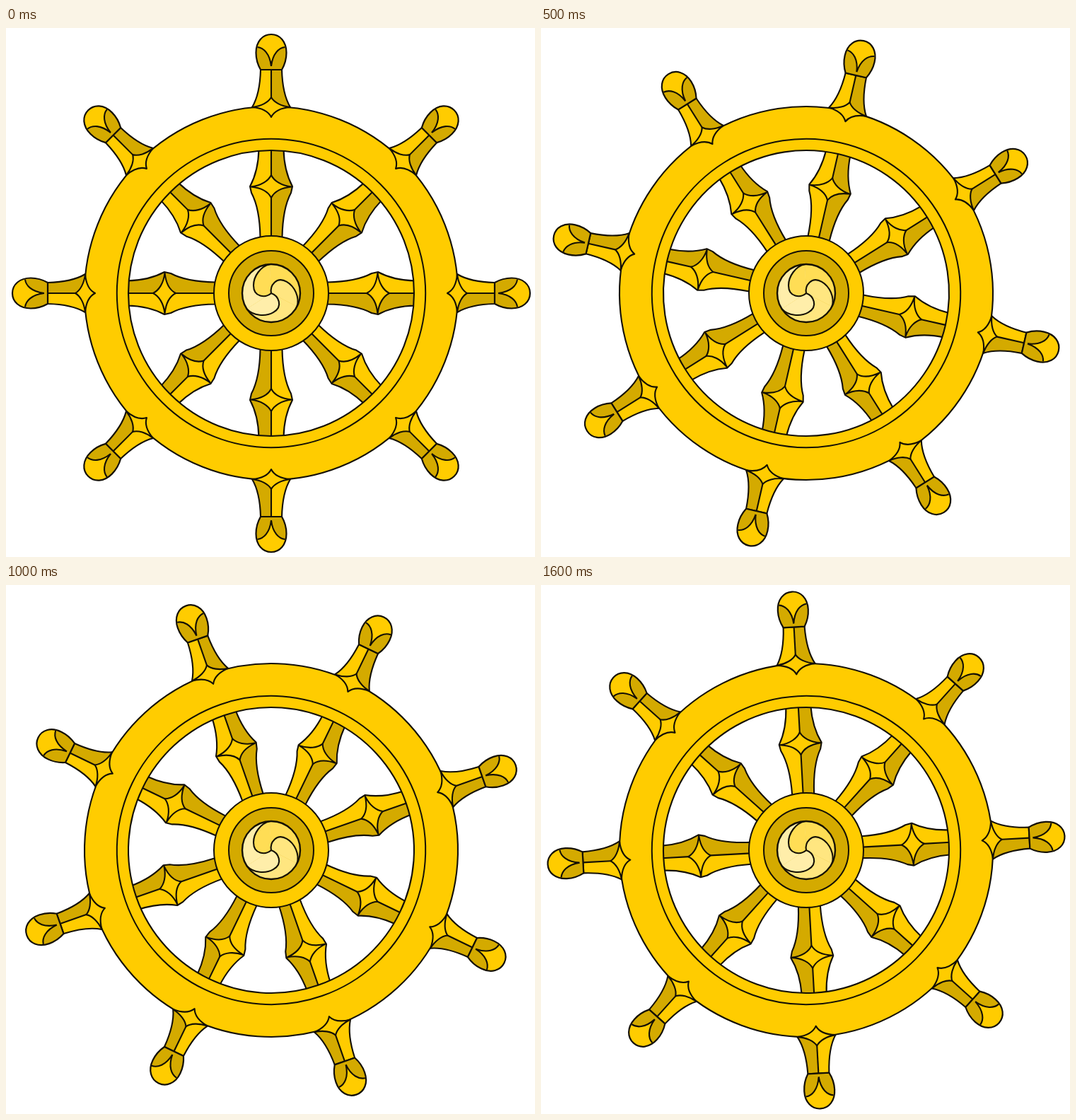
Animation of 748 by 748 pixels, one loop 1700 ms. Source, as an HTML page with a canvas:

```html
<!DOCTYPE html>
<html lang="en">
<head>
<meta charset="utf-8">
<title>Turning wheel</title>
<style>
html, body { margin: 0; width: 100%; height: 100%; overflow: hidden; background: #fff; }
canvas { display: block; width: 748px; height: 748px; }
</style>
</head>
<body>
<canvas id="stage" width="748" height="748"></canvas>
<script>
const ctx = document.getElementById('stage').getContext('2d');
const GOLD = '#ffcc00', SHADE = '#d4aa00', INK = '#141005';
const SWIRL = ['#ffdd55', '#ffe680', '#ffeeaa'];
const CENTER = 375, STEP = 100, STEPS = 17;

// Step number and wheel angle in degrees, linear in between.
const turns = [[0, 0], [2, 5.1], [5, 12.85], [8, 20.7], [12, 30.9], [14, 36.15], [16, 41.85]];

// Paths in wheel space: origin at the hub, one spoke pointing up.
const spokeSide = 'M0-79 L15.5-79 C16-108 20-127 28-142 L30-151 C23-164 18-180 17.5-204 L0-204';
const spoke = new Path2D(spokeSide + ' Z');
const spokeEdge = new Path2D(spokeSide);
const spokeRidge = new Path2D('M0-79 V-135 M0-166 V-204');
const spokeStar = new Path2D(
  'M0-167 C4-159 14-152 29-150.5 C14-149 4-143 0-135 C-4-143-14-149-29-150.5 C-14-152-4-159 0-167 Z');

const neckSide = 'M0-316 L15-316 C15.5-296 18-278 27-263';
const neck = new Path2D(neckSide + ' L0-263 Z');
const neckEdge = new Path2D(neckSide);
const neckRidge = new Path2D('M0-316 V-277');
const rimStar = new Path2D(
  'M0-277 C4-270 14-264.5 27-263 C14-262 4-257 0-249 C-4-257-14-262-27-263 C-14-264.5-4-270 0-277 Z');
const knob = new Path2D(
  'M-15-316 C-19-323-21.5-331-21.5-340 C-21.5-356-12-366 0-366 C12-366 21.5-356 21.5-340 C21.5-331 19-323 15-316 Z');
const petal = new Path2D('M15-316 C19-323 21.5-331 21.5-340 L19.5-348 C11-347 2-339 0-322 L0-316 Z');
const petalEdge = new Path2D('M19.5-348 C11-347 2-339 0-321');

const swirlArm = new Path2D('M0 0 C-8 7-25 6-25-11 C-25-24-15-38-2-41');
const armEnd = Math.atan2(-41, -2);

function paint(path, fill) {
  ctx.fillStyle = fill;
  ctx.fill(path);
}

function line(path, width = 2.1) {
  ctx.lineWidth = width;
  ctx.stroke(path);
}

function shape(path, fill) {
  paint(path, fill);
  line(path);
}

function mirrored(draw) {
  for (const side of [-1, 1]) {
    ctx.save();
    ctx.scale(side, 1);
    draw(side);
    ctx.restore();
  }
}

function around(count, draw) {
  for (let i = 0; i < count; i++) {
    ctx.save();
    ctx.rotate(i * 2 * Math.PI / count);
    draw(i);
    ctx.restore();
  }
}

function disc(radius, fill, width = 2) {
  const path = new Path2D();
  path.arc(0, 0, radius, 0, 2 * Math.PI);
  if (fill) paint(path, fill);
  line(path, width);
}

function drawFacets(area, edge) {
  mirrored(side => {
    paint(area, side > 0 ? SHADE : GOLD);
    line(edge);
  });
}

function drawSpoke() {
  drawFacets(spoke, spokeEdge);
  line(spokeRidge);
  shape(spokeStar, GOLD);
}

function drawHandle() {
  drawFacets(neck, neckEdge);
  line(neckRidge);
  shape(rimStar, GOLD);
  paint(knob, GOLD);
  mirrored(() => {
    paint(petal, SHADE);
    line(petalEdge);
  });
  line(knob, 2.2);
}

function drawRim() {
  const ring = new Path2D();
  ring.arc(0, 0, 264, 0, 2 * Math.PI);
  ring.closePath();
  ring.moveTo(202, 0);
  ring.arc(0, 0, 202, 0, 2 * Math.PI, true);
  shape(ring, GOLD);
  disc(218.2, null);
}

// Each comma is a third of the disc plus the lobe under its own arm.
function drawSwirl() {
  const sector = new Path2D('M0 0');
  sector.arc(0, 0, 41, armEnd, armEnd + 2 * Math.PI / 3);
  around(3, i => paint(sector, SWIRL[i]));
  around(3, i => paint(swirlArm, SWIRL[i]));
  around(3, () => line(swirlArm));
  disc(41, null, 2.4);
}

function drawHub() {
  disc(81, GOLD);
  disc(60, SHADE);
  drawSwirl();
}

function angleAt(step) {
  const next = turns.findIndex(([at]) => at >= step);
  if (next === 0) return 0;
  const [s0, a0] = turns[next - 1], [s1, a1] = turns[next];
  return a0 + (a1 - a0) * (step - s0) / (s1 - s0);
}

function render(now) {
  const step = Math.floor(now / STEP) % STEPS;
  ctx.setTransform(1, 0, 0, 1, 0, 0);
  ctx.fillStyle = '#fff';
  ctx.fillRect(0, 0, 748, 748);
  ctx.translate(CENTER, CENTER);
  ctx.strokeStyle = INK;
  ctx.lineJoin = 'round';
  ctx.save();
  ctx.rotate(angleAt(step) * Math.PI / 180);
  around(8, drawSpoke);
  drawRim();
  around(8, drawHandle);
  ctx.restore();
  drawHub();
}

const start = performance.now();
function tick() {
  render(performance.now() - start);
  requestAnimationFrame(tick);
}
tick();
</script>
</body>
</html>
```
